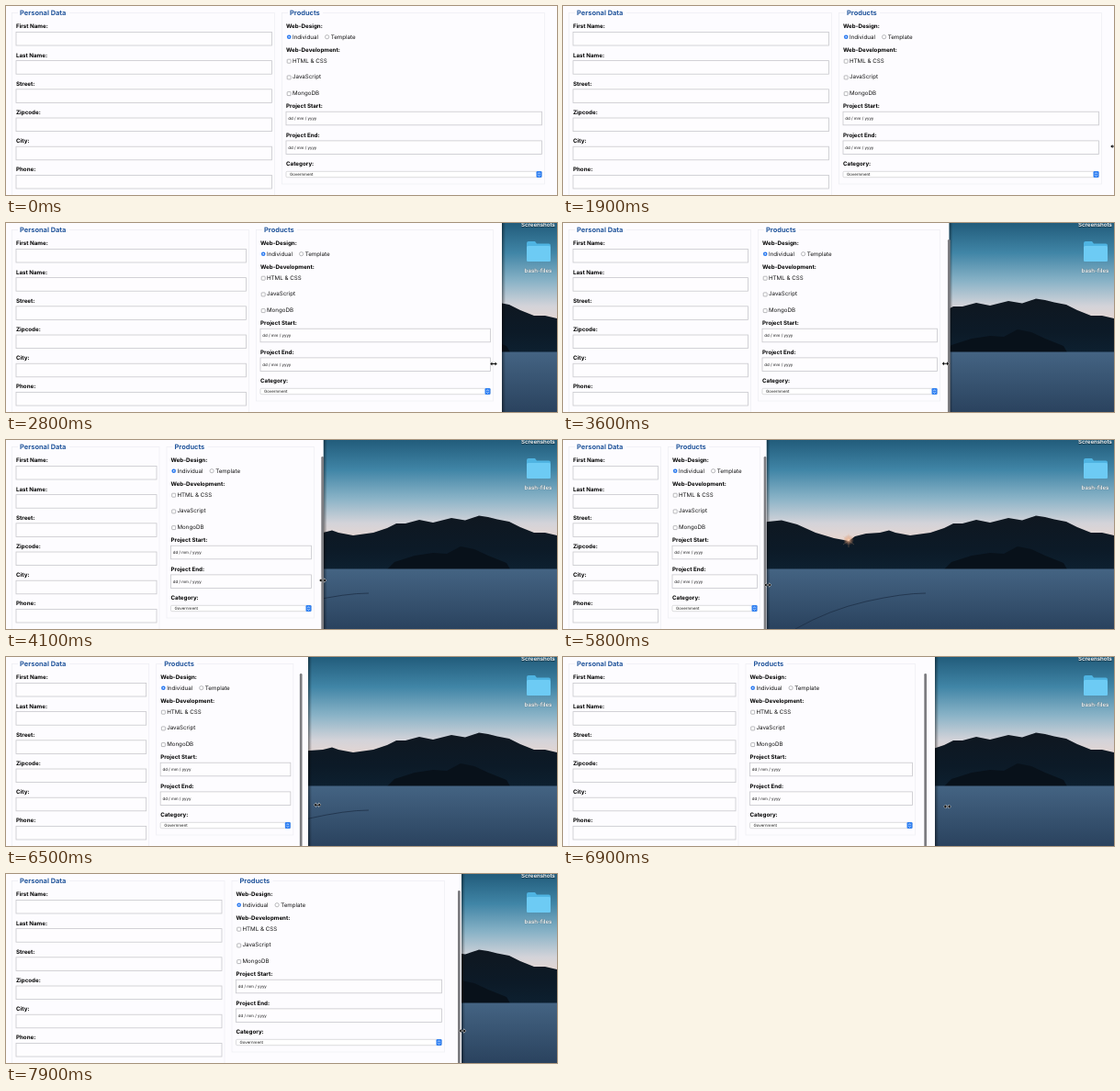
An HTML page that plays this animation: 600x206 px, repeating every 8 s.

```html
<!DOCTYPE html>
<html lang="en">
<head>
<meta charset="utf-8">
<title>Responsive form</title>
<style>
html, body { margin: 0; width: 100%; height: 100%; overflow: hidden; background: #fdfcff; }
svg { display: block; width: 600px; height: 206px; }
text { font: 6.2px Inter, "Liberation Sans", sans-serif; fill: #111; text-rendering: geometricPrecision; }
.label { font-weight: 700; fill: #000; }
.legend { font-weight: 700; font-size: 7.45px; fill: #23569c; }
.small { font-size: 4.4px; }
.desk { font-weight: 600; font-size: 6.1px; fill: #fff; text-anchor: middle; text-shadow: 0 .5px 1px #0009; }
.input { fill: #fefdff; stroke: #c8c8cc; stroke-width: .8; }
.frame { fill: none; stroke: #efeff4; stroke-width: .8; }
.box { fill: #fff; stroke: #8c8c90; stroke-width: .6; }
.select { fill: #fff; stroke: #c4c4c8; stroke-width: .6; }
</style>
</head>
<body>
<svg viewBox="0 0 600 206">
  <defs>
    <linearGradient id="sky" x2="0" y2="1">
      <stop offset="0" stop-color="#225c7b"/>
      <stop offset=".28" stop-color="#4085a6"/>
      <stop offset=".55" stop-color="#8ab3c7"/>
      <stop offset=".78" stop-color="#d3d3d9"/>
      <stop offset="1" stop-color="#f0d8cd"/>
    </linearGradient>
    <linearGradient id="hill" x2="0" y2="1">
      <stop offset="0" stop-color="#0f1720"/>
      <stop offset=".6" stop-color="#0c1a27"/>
      <stop offset="1" stop-color="#0d2030"/>
    </linearGradient>
    <linearGradient id="lake" x2="0" y2="1">
      <stop offset="0" stop-color="#446483"/>
      <stop offset=".35" stop-color="#3b5876"/>
      <stop offset="1" stop-color="#2a425e"/>
    </linearGradient>
    <linearGradient id="shade">
      <stop offset="0" stop-color="#000" stop-opacity=".45"/>
      <stop offset="1" stop-color="#000" stop-opacity="0"/>
    </linearGradient>
    <radialGradient id="sun">
      <stop offset="0" stop-color="#fff0d8"/>
      <stop offset=".3" stop-color="#e9a780" stop-opacity=".6"/>
      <stop offset="1" stop-color="#c07850" stop-opacity="0"/>
    </radialGradient>
  </defs>

  <g id="desktop">
    <rect width="600" height="116" fill="url(#sky)"/>
    <path fill="url(#hill)" d="M200 94L223 89 238 87.500 255 92 275 101 295 107 311 110 318 105 330 102 345 101 355 98.500 362 101 378 104 400 101 415 96 425 91 435 91 450 87 465 90 485 85 500 87.500 515 82.500 525 84 535 86.500 548 89 560 95 575 101 587 101 600 104V142H200Z"/>
    <path fill="#08111a" d="M415 141L423 133 445 126 465 123 480 124 495 116 510 119 525 126 545 134 549 141Z"/>
    <rect y="140.500" width="600" height="66" fill="url(#lake)"/>
    <path d="M253 206Q290 185 330 176T395 167" fill="none" stroke="#1d2e44" opacity=".75"/>
    <circle cx="311" cy="109" r="6" fill="url(#sun)"/>
    <path d="M311 102V117M305 105L317 114M305 114L317 105" stroke="#e8b08c" stroke-width=".4" opacity=".6"/>
    <path d="M567 22q0-2 2-2h7l2 2.500h13q2 0 2 2V40q0 2-2 2h-22q-2 0-2-2Z" fill="#4fb4e2"/>
    <rect x="567" y="25" width="26" height="17" rx="1.500" fill="#6dcbf4"/>
    <text class="desk" x="579.500" y="4.300">Screenshots</text>
    <text class="desk" x="579.500" y="53.500">bash-files</text>
  </g>

  <rect id="shadow" width="4" height="206" fill="url(#shade)"/>
  <rect id="page" height="206" fill="#fdfcff"/>
  <g id="left"></g>
  <g id="right"></g>
  <rect id="bar" y="18" width="2.700" height="190" rx="1.300" fill="#7c7c80"/>
  <path id="cursor" d="M-3.800 0l2.300-2v1.500h3v-1.500L3.800 0 1.500 2V.5h-3v1.500Z" fill="#111" stroke="#fff" stroke-width=".8" paint-order="stroke"/>
</svg>
<script>
const $ = id => document.getElementById(id);
const text = (x, y, s, cls = "") => `<text class="${cls}" x="${x}" y="${y}">${s}</text>`;
const label = (y, s) => text(11, y, s, "label");
const input = y => `<rect class="input wide" x="11" y="${y}" height="14.600"/>`;
const frame = h => `<rect class="frame" y="7.500" height="${h}"/>`;
const legend = (x, w, s) =>
  `<rect x="${x - 2}" y="4" width="${w}" height="7" fill="#fdfcff"/>` + text(x, 10.3, s, "legend");

const fields = ["First Name:", "Last Name:", "Street:", "Zipcode:", "City:", "Phone:"];
$("left").innerHTML = frame(220) + legend(15, 56, "Personal Data") +
  fields.map((s, i) => label(24.3 + i * 31.2, s) + input(28.4 + i * 31.2)).join("");

const checks = ["HTML &amp; CSS", "JavaScript", "MongoDB"];
const dates = ["Project Start:", "Project End:"];
$("right").innerHTML = frame(186.5) + legend(15, 38, "Products") +
  label(24.3, "Web-Design:") +
  '<circle cx="14.200" cy="33.700" r="2.300" fill="#2f7cf0"/><circle cx="14.200" cy="33.700" r=".8" fill="#fff"/>' +
  text(18, 35.8, "Individual") +
  '<circle class="box" cx="55.600" cy="33.700" r="2.100"/>' + text(59.7, 35.8, "Template") +
  label(50.2, "Web-Development:") +
  checks.map((s, i) => `<rect class="box" x="12.200" y="${58.2 + i * 17.7}" width="4" height="4" rx=".6"/>` +
    text(18, 61.6 + i * 17.7, s)).join("") +
  dates.map((s, i) => label(111 + i * 31.7, s) + input(115.2 + i * 31.7) +
    text(13.3, 124.1 + i * 31.7, "dd / mm / yyyy", "small")).join("") +
  label(174.3, "Category:") +
  '<rect class="select wide" x="11" y="180.300" height="6.400" rx="1.200"/>' +
  text(15, 185.1, "Government", "small") +
  `<g id="arrows"><rect x="-6" y="180" width="6" height="7" rx="1.200" fill="#3583f2"/>
   <path d="M-4.200 183l1.200-1.300 1.200 1.300M-4.200 184.200l1.200 1.300 1.200-1.300" fill="none" stroke="#fff" stroke-width=".6"/></g>`;

// time, window edge, column pitch, scrollbar x, cursor x, cursor y
const keys = [
  [0, 604, 294, 620, 625, 152],
  [1500, 604, 294, 620, 612, 152],
  [1900, 604, 294, 620, 600, 153],
  [2300, 600, 294, 600, 590, 153.5],
  [2800, 540, 266, 540, 531, 153.5],
  [4100, 345.7, 168.5, 343.3, 345, 153],
  [5000, 246, 119, 243, 245, 156],
  [5500, 221.7, 108, 218.7, 223, 158],
  [5800, 221.7, 108, 218.7, 223, 158],
  [6000, 234, 113, 228, 240, 159],
  [6900, 405, 192.5, 393.3, 418.5, 163],
  [7900, 496, 239.5, 492, 497, 171]
];

function poseAt(t) {
  const i = keys.findIndex(k => k[0] > t);
  if (i < 0) return keys.at(-1);
  const a = keys[i - 1], b = keys[i], u = (t - a[0]) / (b[0] - a[0]);
  return a.map((v, j) => v + (b[j] - v) * u);
}

const wide = document.querySelectorAll(".wide");
const frames = document.querySelectorAll(".frame");
const set = (el, name, value) => el.setAttribute(name, value);

function draw(now) {
  const t = Math.floor(now % 8000 / 100) * 100;
  const [, edge, pitch, bar, cx, cy] = poseAt(t);
  set($("page"), "width", edge);
  set($("shadow"), "x", edge);
  set($("right"), "transform", `translate(${pitch})`);
  wide.forEach(el => set(el, "width", pitch - 15.5));
  set($("arrows"), "transform", `translate(${pitch - 4.5})`);
  frames.forEach(el => {
    set(el, "x", 6.5);
    set(el, "width", pitch - 8);
  });
  set($("bar"), "x", bar);
  set($("bar"), "visibility", t >= 3000 ? "visible" : "hidden");
  set($("cursor"), "transform", `translate(${cx} ${cy})`);
}

const start = performance.now();
function tick() {
  draw(performance.now() - start);
  requestAnimationFrame(tick);
}
tick();
</script>
</body>
</html>
```
